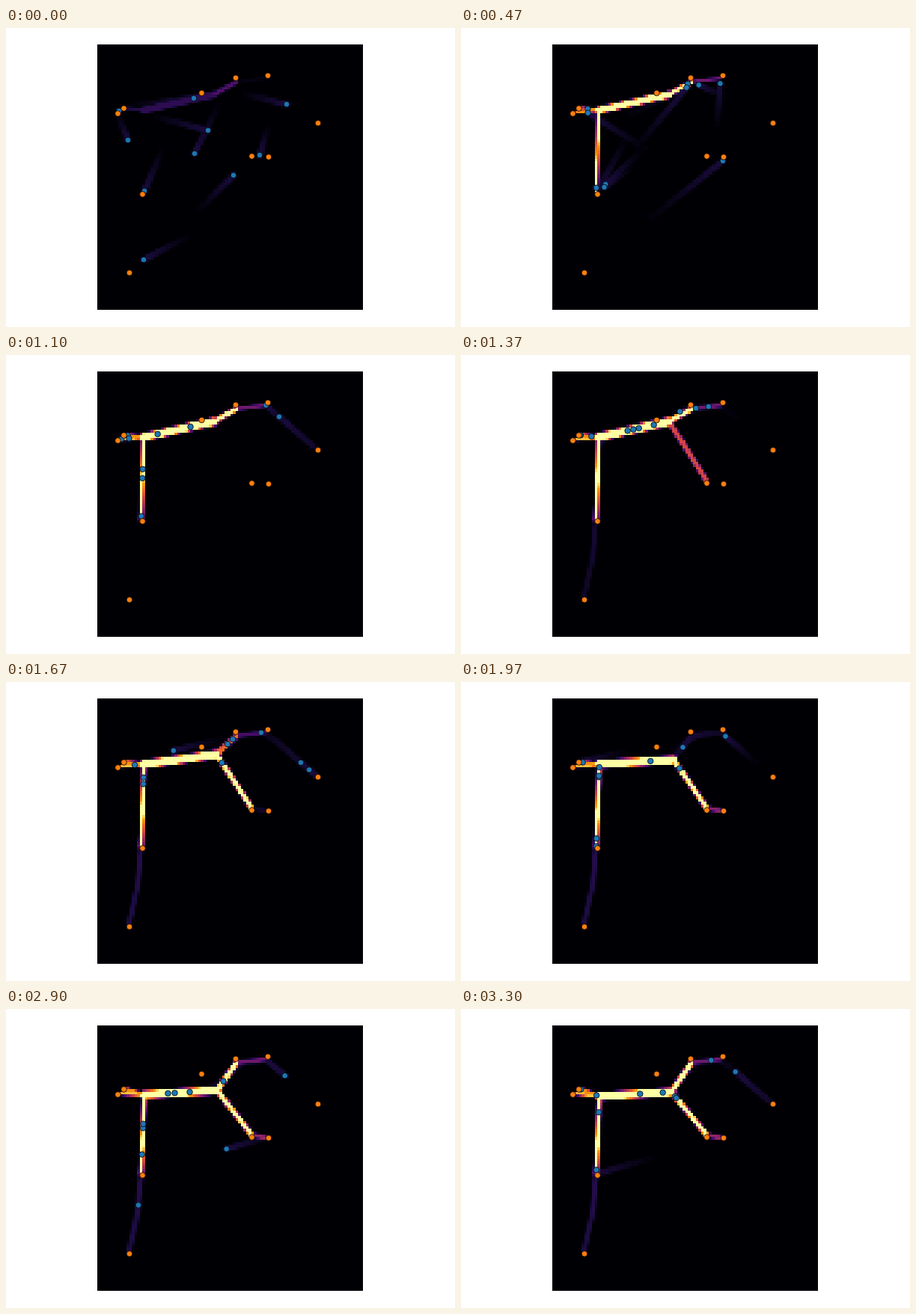
Recreate the animation shown at these times as an HTML page with a canvas. Size 600 by 400 pixels, loop 3.33 s.

```html
<!DOCTYPE html>
<html>
<head>
<meta charset="utf-8">
<style>
html, body { margin: 0; width: 100%; height: 100%; overflow: hidden; background: #fff; }
canvas { display: block; }
</style>
</head>
<body>
<canvas id="stage" width="600" height="400"></canvas>
<script>
const ctx = document.getElementById('stage').getContext('2d');
const GRID = 100, LEFT = 122, TOP = 22, SIZE = 355, CELL = SIZE / GRID;
const LOOP = 3330, FRAMES = 100, TRAIL = 8;

const map = document.createElement('canvas');
map.width = map.height = GRID;
const mapCtx = map.getContext('2d');
const image = mapCtx.createImageData(GRID, GRID);
const field = new Float32Array(GRID * GRID);

const clamp = v => Math.max(0, Math.min(1, v));
const lerp = (a, b, t) => a + (b - a) * t;
const mix = (p, q, t) => p.map((v, i) => lerp(v, q[i], t));
const ramp = (frame, from, to) => clamp((frame - from) / (to - from));
const distance = (p, q) => Math.hypot(p[0] - q[0], p[1] - q[1]);

let seed = 11;
const random = () => (seed = seed * 16807 % 2147483647) / 2147483647;

const HEAT = ['000004', '1b0c41', '4a0c6b', '781c6d', 'a52c60', 'cf4446', 'ed6925', 'fb9b06', 'fcffa4']
  .map(hex => [0, 2, 4].map(i => parseInt(hex.slice(i, i + 2), 16)));

function heat(v) {
  const x = clamp(v) * (HEAT.length - 1), i = Math.min(HEAT.length - 2, Math.floor(x));
  return mix(HEAT[i], HEAT[i + 1], x - i);
}

const FOOD = [
  [149.5, 114.5], [157.5, 107.5], [261.5, 87], [307, 66.7], [350, 63.7],
  [417, 127.3], [328.5, 171.6], [351, 172.6], [182.5, 222.5], [165, 327.5]
];

// A tree: each node has a vein to its parent, growing from its birth frame.
// Points are the early position and, for moving nodes, the middle and late ones.
const NODES = {
  fork: { at: [[278, 89], [284, 104], [281, 111]] },
  joint: { parent: 'fork', at: [[184, 110], [185, 110], [185, 117]], level: 1.06, half: 1.95, birth: -2 },
  westUp: { parent: 'joint', at: [[159, 107]], level: .85, half: 1.1, birth: -2 },
  westLow: { parent: 'joint', at: [[154, 112.5]], level: .92, half: 1.1, birth: 3 },
  south: { parent: 'joint', at: [[180.6, 221]], level: 1.02, half: 1.2, birth: 0 },
  bend: { parent: 'south', at: [[176, 272]], level: .15, half: 1.3, birth: 34 },
  bottom: { parent: 'bend', at: [[164, 325]], level: .13, half: 1.3, birth: 34 },
  north: { parent: 'fork', at: [[308, 72]], level: 1.08, half: 1.35, birth: -3, swaps: true },
  northEast: { parent: 'north', at: [[347, 67]], level: .35, half: 1.1, birth: -1, swaps: true },
  east: { parent: 'northEast', at: [[415, 126]], level: 0, half: 1, birth: 0 },
  branch: { parent: 'fork', at: [[328, 168]], level: 1.08, half: 1.3, birth: 34 },
  branchEnd: { parent: 'branch', at: [[346, 172]], level: .45, half: 1.2, birth: 48 }
};

// Where each walker is at the start, and where it came from
const SCOUTS = [
  [[151, 111], [152, 112]], [[251, 94], [170, 103]], [[163, 150], [150, 118]],
  [[185, 218], [208, 165]], [[184, 310], [241, 280]], [[270, 137], [200, 119]],
  [[252, 168], [283, 105]], [[375, 102], [320, 89]], [[339, 170], [349, 135]],
  [[304, 197], [258, 243]]
];

const GOALS = ['south', 'south', 'westUp', 'westLow', 'north', 'northEast',
  'east', 'branch', 'branch', 'branchEnd', 'bottom'];

function nodeAt(name, frame) {
  const [early, middle = early, late = middle] = NODES[name].at;
  return mix(mix(early, middle, ramp(frame, 41, 58)), late, ramp(frame, 60, 99));
}

function route(from, to) {
  const chain = name => name ? [name, ...chain(NODES[name].parent)] : [];
  const up = chain(from), down = chain(to);
  const meet = up.find(name => down.includes(name));
  return [...up.slice(0, up.indexOf(meet) + 1), ...down.slice(0, down.indexOf(meet)).reverse()];
}

function makeWalker([head, tail]) {
  const trip = 13 + 7 * random();
  const trips = [];
  for (let n = 0, from = null; n * trip < FRAMES; n++) {
    const open = GOALS.filter(name => name !== from && NODES[name].birth <= n * trip);
    const to = open[Math.floor(random() * open.length)];
    const strays = random() < .12;
    trips.push(!from ? [to] : strays ? [from, to] : route(from, to));
    from = to;
  }
  return { head, tail, trip, trips };
}
const walkers = SCOUTS.map(makeWalker);

function along(path, t) {
  const lengths = path.slice(1).map((p, i) => distance(p, path[i]));
  let left = t * lengths.reduce((a, b) => a + b, 0);
  for (let i = 0; i < lengths.length; i++) {
    if (left <= lengths[i]) return mix(path[i], path[i + 1], left / (lengths[i] || 1));
    left -= lengths[i];
  }
  return path[path.length - 1];
}

function walkerAt({ head, tail, trip, trips }, frame) {
  if (frame < 0) return mix(head, tail, -frame / TRAIL);
  const n = Math.floor(frame / trip);
  const path = trips[n].map(name => nodeAt(name, frame));
  return along(n ? path : [head, ...path], frame / trip - n);
}

function stroke(p, q, amp, half) {
  if (amp < .01) return;
  const cell = ([x, y]) => [(x - LEFT) / CELL - .5, (y - TOP) / CELL - .5];
  const [ax, ay] = cell(p), [bx, by] = cell(q);
  const dx = bx - ax, dy = by - ay, len2 = dx * dx + dy * dy || 1;
  for (let y = Math.ceil(Math.min(ay, by) - half); y <= Math.max(ay, by) + half; y++) {
    for (let x = Math.ceil(Math.min(ax, bx) - half); x <= Math.max(ax, bx) + half; x++) {
      const t = clamp(((x - ax) * dx + (y - ay) * dy) / len2);
      const d = Math.hypot(x - ax - dx * t, y - ay - dy * t);
      const i = y * GRID + x;
      field[i] = Math.max(field[i], amp * clamp((half - d) * 1.5));
    }
  }
}

function drawField(frame) {
  field.fill(0);
  // The upper route fades out and returns while the fork moves down.
  const swap = Math.abs(1 - 2 * ramp(frame, 46, 72));
  const widen = lerp(.85, 1, ramp(frame, 14, 41));
  for (const [name, { parent, level, half, birth, swaps }] of Object.entries(NODES)) {
    if (!parent) continue;
    const amp = level * ramp(frame, birth, birth + 12) * (swaps ? swap : 1);
    stroke(nodeAt(name, frame), nodeAt(parent, frame), amp, half * widen);
  }
  for (const walker of walkers) {
    for (let i = 0; i < TRAIL; i++) {
      stroke(walkerAt(walker, frame - i), walkerAt(walker, frame - i - 1), .11 * (1 - i / TRAIL), 1.5);
    }
  }
  field.forEach((v, i) => {
    image.data.set(heat(v), i * 4);
    image.data[i * 4 + 3] = 255;
  });
  mapCtx.putImageData(image, 0, 0);
  ctx.imageSmoothingEnabled = false;
  ctx.drawImage(map, LEFT, TOP, SIZE, SIZE);
}

function dot([x, y], color) {
  ctx.beginPath();
  ctx.arc(x, y, 3.8, 0, Math.PI * 2);
  ctx.fillStyle = color;
  ctx.fill();
  ctx.lineWidth = .8;
  ctx.strokeStyle = '#000';
  ctx.stroke();
}

function draw(frame) {
  ctx.fillStyle = '#fff';
  ctx.fillRect(0, 0, 600, 400);
  drawField(frame);
  walkers.forEach(walker => dot(walkerAt(walker, frame), '#1f77b4'));
  FOOD.forEach(p => dot(p, '#ff7f0e'));
}

let shown = -1;
const start = performance.now();
function tick() {
  const ticks = Math.floor(((performance.now() - start) % LOOP) / 10);
  const frame = Math.min(FRAMES - 1, Math.floor((ticks + .5) * .3));
  if (frame !== shown) draw(shown = frame);
  requestAnimationFrame(tick);
}
tick();
</script>
</body>
</html>
```
